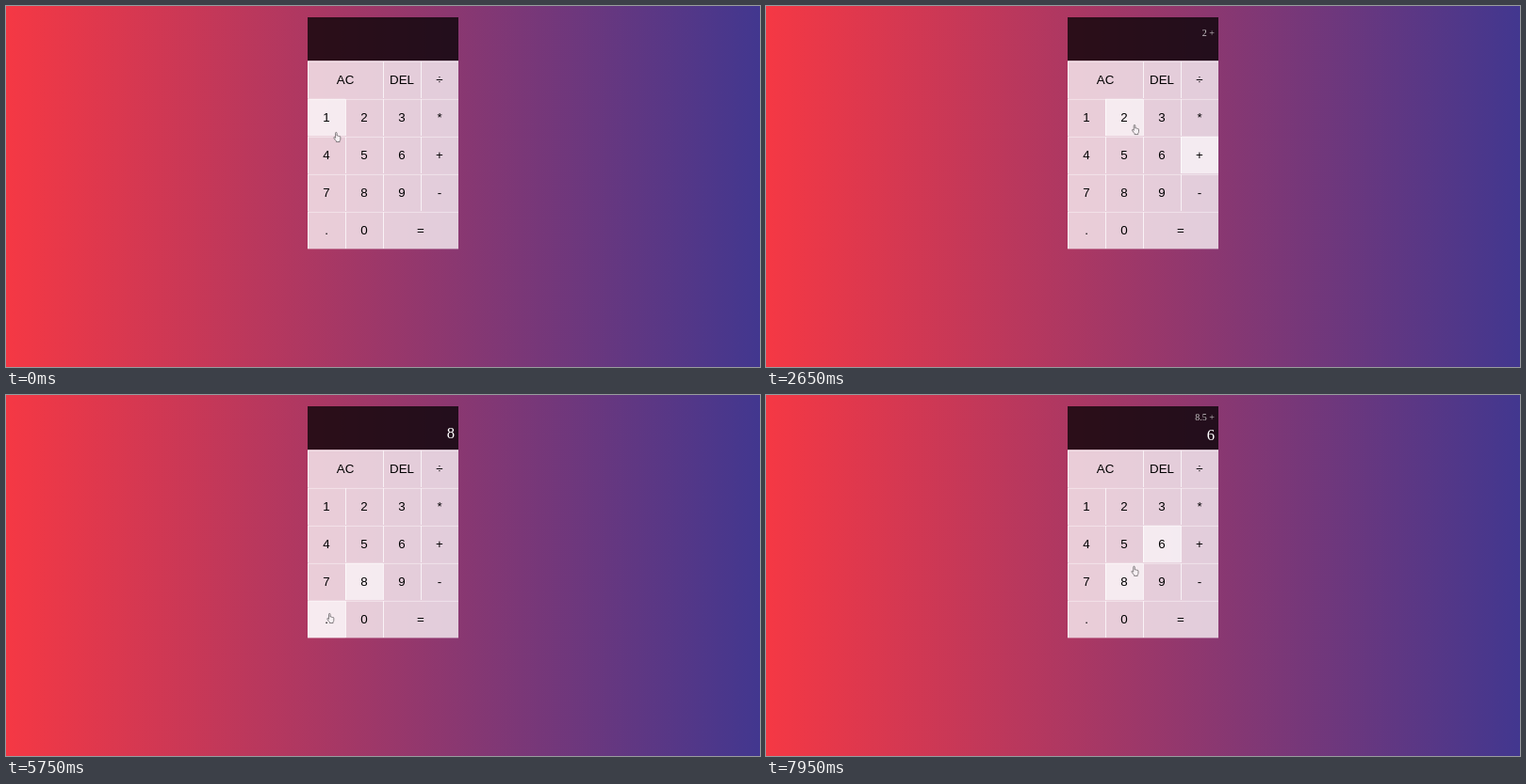
An HTML page that plays this animation: 800x384 px, repeating every 8000 ms.

```html
<!DOCTYPE html>
<html lang="en">
<head>
<meta charset="utf-8">
<title>Calculator</title>
<style>
  html, body { margin: 0; width: 100%; height: 100%; overflow: hidden; }
  body { position: relative; background: linear-gradient(to right, #f53844, #42378f); }
  .calc {
    position: absolute; left: 320px; top: 11.6px; width: 400px;
    display: grid; grid-template-columns: repeat(4, 100px);
    grid-template-rows: 116px repeat(5, 100px);
    transform: scale(.4); transform-origin: 0 0;
  }
  .screen {
    grid-column: 1 / -1; box-sizing: border-box; padding: 10px;
    display: flex; flex-direction: column; align-items: flex-end; justify-content: space-around;
    background: rgba(0, 0, 0, .75); font-family: "Liberation Serif", "Times New Roman", serif;
  }
  #prev { color: rgba(255, 255, 255, .75); font-size: 25px; }
  #cur { color: #fff; font-size: 41.6px; }
  .key {
    background: rgba(255, 255, 255, .75); box-shadow: inset 2.5px 2.5px rgba(255, 255, 255, .75);
    display: flex; align-items: center; justify-content: center;
    color: #000; font: 33.3px "Liberation Sans", Arial, sans-serif;
  }
  .key.lit { background: rgba(255, 255, 255, .9); }
  .wide { grid-column: span 2; }
  #hand { position: absolute; left: -3px; top: -1px; width: 8.5px; height: 11px; overflow: visible; }
</style>
</head>
<body>
<div class="calc">
  <div class="screen"><div id="prev"></div><div id="cur"></div></div>
</div>
<svg id="hand" viewBox="0 0 20 26">
  <path d="M6 14V3.2Q6 1 7.8 1T9.6 3.2V9.5Q11.2 8.4 12.6 10Q14.2 9 15.4 10.8Q18.4 10 18.4 13V18Q18.4 20.5 16.6 22.5V25H8V22.8Q5 20 2 15.2Q1.2 13.6 2.4 13Q4 12.4 6 15Z"
        fill="#f6f0f3" stroke="#5a5558" stroke-width="1.7" stroke-linejoin="round"/>
</svg>
<script>
  const LOOP = 8000, LEFT = 320, TOP = 58, CELL = 40;
  const TRAVEL = 300, DWELL = 90;
  const rows = ['AC DEL ÷', '1 2 3 *', '4 5 6 +', '7 8 9 -', '. 0 ='];

  // When each key is pressed; the last press lies beyond the loop.
  const presses = [
    [600, '1'], [1150, '+'], [2000, '1'], [2330, '+'], [2850, '2'], [3120, '+'], [3600, '3'],
    [3950, '='], [5300, '8'], [5900, '.'], [6500, '5'], [7250, '+'], [7660, '6'], [8300, '8']
  ];

  const $ = id => document.getElementById(id);
  const calc = document.querySelector('.calc');
  const keys = {};
  rows.forEach((row, r) => {
    let col = 0;
    for (const label of row.split(' ')) {
      const span = label === 'AC' || label === '=' ? 2 : 1;
      const el = document.createElement('div');
      el.className = span > 1 ? 'key wide' : 'key';
      el.textContent = label;
      calc.append(el);
      keys[label] = { el, x: LEFT + col * CELL, y: TOP + r * CELL, w: span * CELL };
      col += span;
    }
  });

  // The hand aims near a key's centre, leaning towards the middle of the pad.
  function aim({ x, y, w }) {
    const cx = x + w / 2, cy = y + CELL / 2;
    return [cx + (390 - cx) * .06, cy + 5 * Math.sign(138 - cy)];
  }

  function fingertip(t) {
    const i = presses.findIndex(([at]) => at + DWELL > t);
    const from = i ? aim(keys[presses[i - 1][1]]) : [350, 135];
    const to = aim(keys[presses[i][1]]);
    const leave = i ? presses[i - 1][0] + DWELL : 0;
    const p = Math.min(1, (t - leave) / TRAVEL);
    const e = p * p * (3 - 2 * p);
    return from.map((v, n) => v + (to[n] - v) * e);
  }

  function readout(t) {
    let sum = '', cur = '', done = false, focus = '';
    for (const [at, key] of presses) {
      if (at > t) break;
      focus = key;
      if (key === '+' || key === '=') {
        const total = String(Number(sum) + Number(cur));
        done = key === '=';
        [sum, cur] = done ? ['', total] : [total, ''];
      } else {
        cur = done ? key : cur + key;
        done = false;
      }
    }
    return { prev: sum && sum + ' +', cur, focus };
  }

  function draw(now) {
    const t = now % LOOP;
    const { prev, cur, focus } = readout(t);
    const [x, y] = fingertip(t);
    $('prev').textContent = prev;
    $('cur').textContent = cur;
    $('hand').style.transform = `translate(${x}px, ${y}px)`;
    for (const [label, k] of Object.entries(keys)) {
      const hover = x >= k.x && x < k.x + k.w && y >= k.y && y < k.y + CELL;
      k.el.classList.toggle('lit', hover || label === focus);
    }
  }

  const start = performance.now();
  function tick() {
    draw(performance.now() - start);
    requestAnimationFrame(tick);
  }
  draw(0);
  requestAnimationFrame(tick);
</script>
</body>
</html>
```
